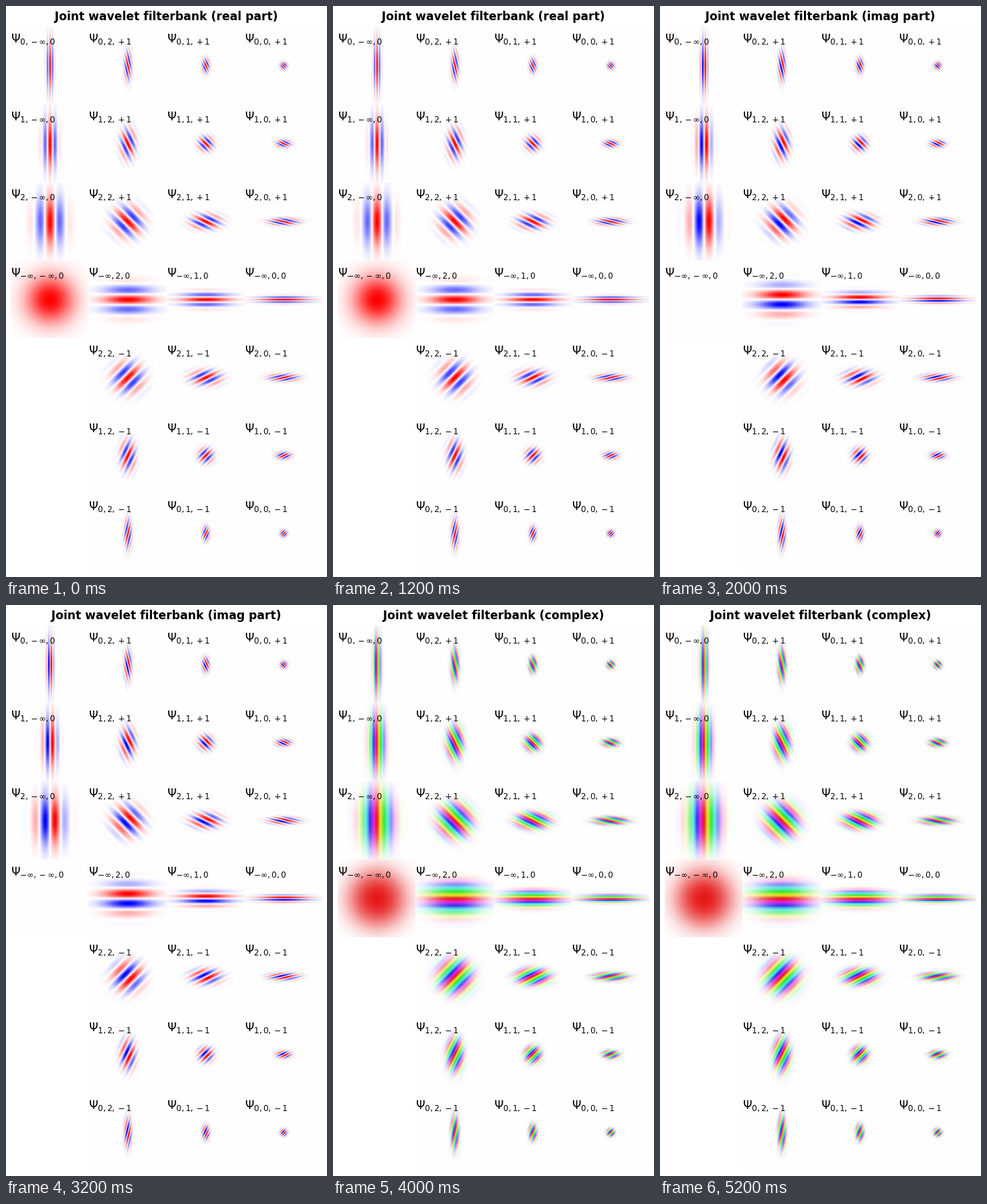
These frames come from a looping animation (475x844 px, 6000 ms). A matplotlib script:

```python
import numpy as np
import matplotlib.pyplot as plt
from matplotlib.animation import FuncAnimation

W, H = 475, 844
LEFT, TOP, CELL = 7.2, 30.2, 115.25
NUDGE = 0.4            # wavelets peak half a sample past the cell centre
PHI_SIGMA = 24.3       # low-pass width in pixels
PSI_RATIO = 0.44       # band-pass width in periods
FONT_PX = 17
PT = 0.72              # points per pixel at 100 dpi

ROW_SCALES = [0, 1, 2, None, 2, 1, 0]
ROW_SPINS = [1, 1, 1, 0, -1, -1, -1]
COL_SCALES = [None, 2, 1, 0]
TITLES = ["real part", "imag part", "complex"]


def wave(t, scale):
    """Morlet wavelet of the given octave, or the Gaussian low-pass."""
    if scale is None:
        return np.exp(-0.5 * (t / PHI_SIGMA) ** 2) + 0j
    period = 8 * 2 ** scale
    sigma = PSI_RATIO * period
    offset = np.exp(-0.5 * (2 * np.pi * PSI_RATIO) ** 2)
    return np.exp(-0.5 * (t / sigma) ** 2) * (np.exp(2j * np.pi * t / period) - offset)


def diverging(v):
    peak = np.abs(v).max() or 1
    return plt.cm.bwr((v / peak + 1) / 2)[..., :3]


def colorize(z):
    """Phase as hue, magnitude as darkness."""
    z = z / np.abs(z).max()
    hue = 6 * ((np.angle(z) / (2 * np.pi)) % 1)
    light = 1 / (1 + np.abs(z))
    chroma = 1.6 * (1 - light)
    ramp = np.stack([np.abs(hue - 3) - 1,
                     2 - np.abs(hue - 2),
                     2 - np.abs(hue - 4)], axis=-1).clip(0, 1)
    rgb = light[..., None] + chroma[..., None] * (ramp - 0.5)
    return np.minimum(rgb, 254 / 255)


def cells():
    for r, (mu, spin) in enumerate(zip(ROW_SCALES, ROW_SPINS)):
        for c, l in enumerate(COL_SCALES):
            if c > 0 or spin >= 0:
                yield LEFT + c * CELL, TOP + r * CELL, mu, l, spin if c else 0


def pixels(start):
    lo, hi = round(start), round(start + CELL)
    offsets = np.arange(lo, hi) + 0.5 - (start + CELL / 2 + NUDGE)
    return slice(lo, hi), offsets


def label(mu, l, spin):
    def name(s):
        return r"-\infty" if s is None else str(s)
    sign = f"{spin:+d}" if spin else "0"
    return rf"$\Psi_{{{name(mu)}, {name(l)}, {sign}}}$"


fig = plt.figure(figsize=(W / 100, H / 100), dpi=100, facecolor="white")
ax = fig.add_axes([0, 0, 1, 1])
ax.axis("off")

pages = np.ones((3, H, W, 3))
for x0, y0, mu, l, spin in cells():
    xs, dx = pixels(x0)
    ys, dy = pixels(y0)
    vertical = wave(dy if spin < 0 else -dy, l)
    z = np.outer(vertical, wave(dx, mu))
    for page, rgb in zip(pages, (diverging(z.real), diverging(z.imag), colorize(z))):
        page[ys, xs] = rgb

image = ax.imshow(pages[0], extent=(0, W, H, 0), interpolation="nearest", aspect="auto")
ax.set_xlim(0, W)
ax.set_ylim(H, 0)

style = dict(family="DejaVu Sans", fontsize=FONT_PX * PT, color="black", va="baseline")
for x0, y0, mu, l, spin in cells():
    ax.text(x0, y0 + 0.205 * CELL, label(mu, l, spin), ha="left", **style)
title = ax.text(237.6, 21, "", ha="center", weight="bold", **style)


def draw(i):
    image.set_data(pages[i])
    title.set_text(f"Joint wavelet filterbank ({TITLES[i]})")
    return image, title


anim = FuncAnimation(fig, draw, frames=3, interval=2000, repeat=True, repeat_delay=0)
plt.show()
```
